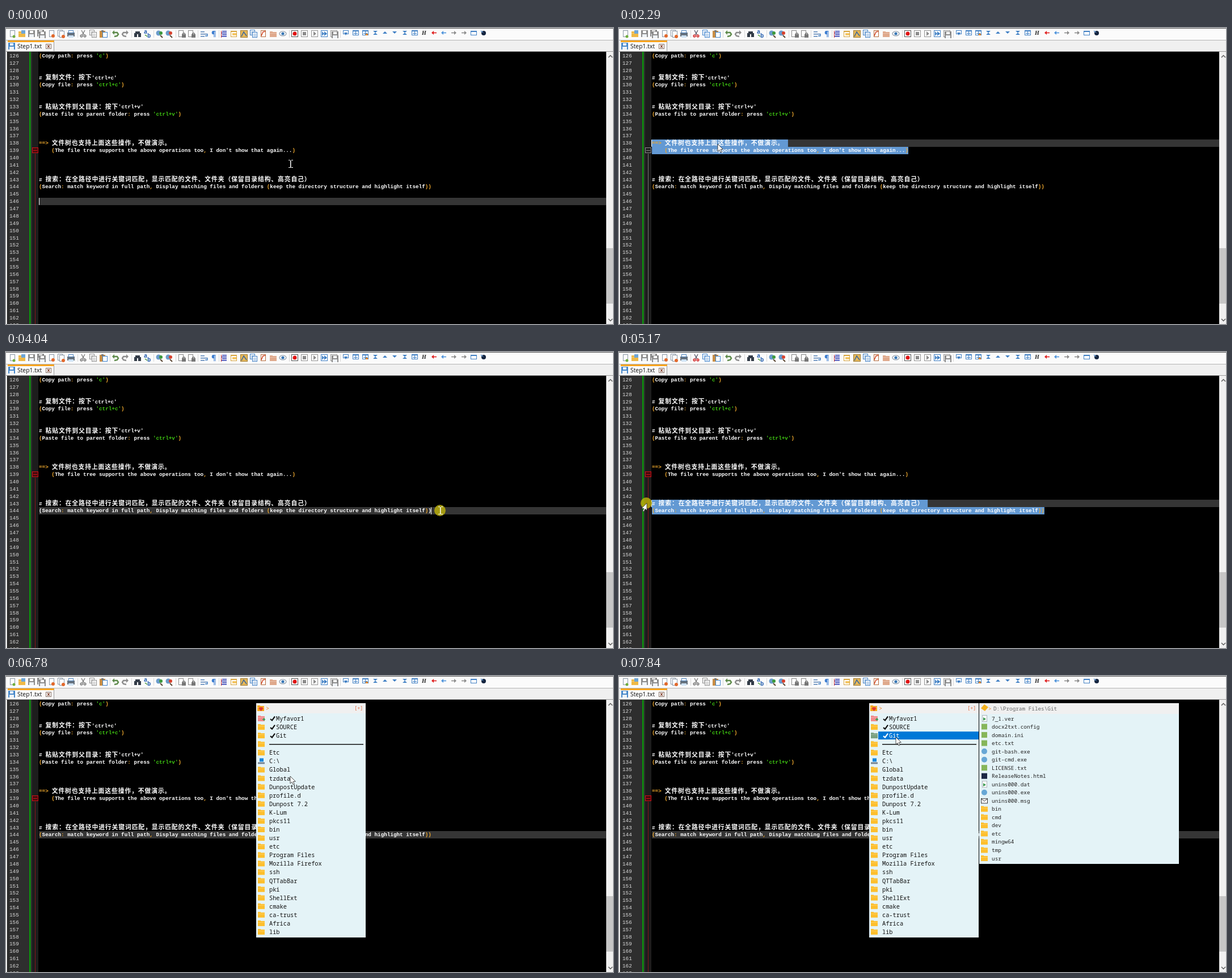
An HTML page with a canvas that plays this animation: 1070x523 px, repeating every 8000 ms.

```html
<!DOCTYPE html>
<html lang="en">
<head>
<meta charset="utf-8">
<title>Editor demo</title>
<style>
html, body { margin: 0; width: 100%; height: 100%; overflow: hidden; background: #000; }
canvas { display: block; }
</style>
</head>
<body>
<canvas id="stage" width="1070" height="523"></canvas>
<script>
const ctx = document.getElementById('stage').getContext('2d');
const LOOP = 8000, LEFT = 58, PITCH = 5.58, WIDE = 11.7, LINE_H = 12.86, FIRST = 126;
const MONO = '9.3px "Liberation Mono", monospace';
const CODE = 'bold ' + MONO;
const CJK = 'bold 10.8px "Noto Sans CJK SC", "Noto Sans CJK", sans-serif';
const MENU = '10.3px "Noto Sans Mono", monospace';
const SUB = '9.4px "Noto Sans Mono", monospace';

const LINES = {
  126: "(Copy path: press 'c')",
  129: "# 复制文件：按下'ctrl+c'",
  130: "(Copy file: press 'ctrl+c')",
  133: "# 粘贴文件到父目录：按下'ctrl+v'",
  134: "(Paste file to parent folder: press 'ctrl+v')",
  138: "==> 文件树也支持上面这些操作，不做演示。",
  139: "    (The file tree supports the above operations too, I don't show that again...)",
  143: "# 搜索：在全路径中进行关键词匹配，显示匹配的文件、文件夹（保留目录结构、高亮自己）",
  144: "(Search: match keyword in full path, Display matching files and folders (keep the directory structure and highlight itself))"
};
const FAVORITES = ['+Myfavor1', '+SOURCE', '+Git', '-', 'Etc', 'C:\\', 'Global', 'tzdata', 'DunpostUpdate',
  'profile.d', 'Dunpost 7.2', 'K-Lum', 'pkcs11', 'bin', 'usr', 'etc', 'Program Files', 'Mozilla Firefox',
  'ssh', 'QTTabBar', 'pki', 'ShellExt', 'cmake', 'ca-trust', 'Africa', 'lib'];
const FILES = ['7_1.ver', 'docx2txt.config', 'domain.ini', 'etc.txt', 'git-bash.exe', 'git-cmd.exe',
  'LICENSE.txt', 'ReleaseNotes.html', 'unins000.dat', 'unins000.exe', 'unins000.msg',
  'bin', 'cmd', 'dev', 'etc', 'mingw64', 'tmp', 'usr'];

// Pointer path: time, x, y
const PATH = [
  [0, 502, 240], [70, 502, 240], [260, 534, 222], [440, 534, 222], [520, 515, 217], [860, 160, 214],
  [950, 93, 211], [1140, 51, 198], [1940, 51, 198], [2290, 174, 205], [2930, 174, 205],
  [3550, 740, 277], [3750, 764, 280], [4040, 766, 280], [4100, 764, 280], [4400, 190, 277],
  [4570, 42, 267], [4640, 41, 267], [5150, 41, 267], [5170, 49, 267], [5300, 60, 270],
  [5700, 313, 282], [5900, 313, 286], [6060, 313, 290], [6250, 380, 415], [6400, 610, 330],
  [6580, 501, 177], [6800, 501, 177], [7480, 488, 92], [7640, 488, 92], [7840, 488, 108], [LOOP, 488, 108]
];
const DRAGS = [
  { press: 520, release: 1950, end: 3640, line: 139 },
  { press: 3640, release: 5300, end: 5720, line: 144 }
];

function pointer(t) {
  let i = 1;
  while (i < PATH.length - 1 && PATH[i][0] < t) i++;
  const [t0, x0, y0] = PATH[i - 1], [t1, x1, y1] = PATH[i];
  const k = Math.max(0, Math.min(1, (t - t0) / (t1 - t0)));
  return { x: x0 + (x1 - x0) * k, y: y0 + (y1 - y0) * k };
}

const isWide = c => c > '\u2fff';
const lineEnd = n => LEFT + [...(LINES[n] || '')].reduce((w, c) => w + (isWide(c) ? WIDE : PITCH), 0);
const lineY = n => 49 + (n - FIRST) * LINE_H;

function rect(color, x, y, w, h) { ctx.fillStyle = color; ctx.fillRect(x, y, w, h); }
function box(color, x, y, w, h) { ctx.strokeStyle = color; ctx.lineWidth = 1; ctx.strokeRect(x + .5, y + .5, w - 1, h - 1); }
function path(points, dx = 0, dy = 0) {
  ctx.beginPath();
  for (let i = 0; i < points.length; i += 2) ctx.lineTo(points[i] + dx, points[i + 1] + dy);
}
function poly(color, points, dx, dy) { path(points, dx, dy); ctx.fillStyle = color; ctx.fill(); }
function line(color, width, points, dx, dy) {
  path(points, dx, dy);
  ctx.strokeStyle = color; ctx.lineWidth = width; ctx.stroke();
}
function disc(color, x, y, r) { ctx.beginPath(); ctx.arc(x, y, r, 0, 7); ctx.fillStyle = color; ctx.fill(); }
function ring(color, x, y, r, a = 0, b = 7) {
  ctx.beginPath(); ctx.arc(x, y, r, a, b); ctx.strokeStyle = color; ctx.lineWidth = 1.5; ctx.stroke();
}
function text(s, x, y, color, font) { ctx.font = font; ctx.fillStyle = color; ctx.fillText(s, x, y); }

// Toolbar icons, each centred at x
function page(x, edge = '#8a97a5', y = 10, h = 12) { rect('#fff', x - 4, y - h / 2, 9, h); box(edge, x - 4, y - h / 2, 9, h); }
function pages(x, edge) {
  for (const d of [-2, 2]) {
    page(x + d, edge, 10 + d, 10);
    for (let y = 8; y < 13; y += 2) rect(edge, x + d - 2, y + d, 5, .6);
  }
}
function floppy(x, y, color) {
  rect(color, x - 6, y - 6, 12, 12);
  rect('#fff', x - 3, y - 5, 6, 4);
  rect('#eef2f6', x - 4, y + 1, 8, 5);
}
function folder(x, y, color = '#fdbf2d') {
  rect(color, x - 6, y - 5, 5, 3);
  rect(color, x - 6, y - 4, 12, 9);
  rect('rgba(255,255,255,.25)', x - 6, y - 2, 12, 1);
}
function textRows(x, color) { for (let y = 5; y < 16; y += 3) rect(color, x - 5 + (y % 2) * 2, y, 10 - (y % 2) * 2, 1.5); }
function panel(x, color, y = 5, h = 11) { rect('#fff', x - 5, y, 11, h); box(color, x - 5, y, 11, h); rect(color, x - 5, y, 11, 2); }
function arrow(x, dir, color) {
  line(color, 1.6, [-4 * dir, 0, 3 * dir, 0], x, 8.5);
  poly(color, [5 * dir, 0, dir, -3.5, dir, 3.5], x, 8.5);
}
function lockPage(x) { page(x - 2, '#888'); rect('#777', x, 11, 7, 6); ring('#777', x + 3.5, 11, 2, Math.PI, 0); }
function scissors(x, on) {
  const blade = on ? '#556' : '#777', handle = on ? '#d02020' : '#777';
  line(blade, 1.3, [-3, -6, 2, 3], x, 10);
  line(blade, 1.3, [3, -6, -2, 3], x, 10);
  ring(handle, x - 3, 14, 1.8);
  ring(handle, x + 3, 14, 1.8);
}

function toolbar(hasSelection) {
  const blue = '#3f7fc4', gray = '#8c8c8c';
  rect('#fbfbfb', 0, 0, 1070, 22);
  rect('#f0f0f0', 0, 22, 1070, 20);
  rect('#555', 0, 0, 1070, 1);
  rect('#b4b4b4', 0, 21, 1070, 1);
  page(11); disc('#6fae3c', 14, 15, 2.5);
  folder(28, 11, '#efb947'); rect('#6ea6d8', 27, 4, 7, 6);
  floppy(45, 10, gray);
  floppy(61, 9, gray); floppy(64, 12, gray);
  page(80); disc('#e2692c', 83, 14, 3);
  page(95, undefined, 9); page(98, undefined, 11); disc('#e2692c', 101, 15, 3);
  rect('#66727e', 108, 8, 13, 7); rect('#fff', 110, 4, 9, 5); box('#4c82bd', 110, 4, 9, 5); rect('#cfe3f5', 110, 13, 9, 4);
  scissors(136, hasSelection);
  pages(153, hasSelection ? '#3d82cc' : gray);
  rect('#c98e45', 165, 5, 10, 12); rect('#777', 168, 4, 4, 3); page(174, '#3d82cc', 12, 10);
  for (const [x, dir, color] of [[193, 1, '#5d8a4a'], [210, -1, gray]]) {
    line(color, 2.4, [-4 * dir, 8, 3 * dir, 8, 5 * dir, 11, 3 * dir, 14, -2 * dir, 15], x, 0);
    poly(color, [-6 * dir, 8, -2 * dir, 4, -2 * dir, 12], x, 0);
  }
  rect('#333c48', 226, 9, 5, 7); rect('#333c48', 233, 9, 5, 7); rect('#333c48', 228, 6, 8, 5);
  text('a', 243, 10, '#2a62b0', 'bold 10px "Open Sans", sans-serif');
  text('b', 249, 17, '#2a62b0', 'bold 10px "Open Sans", sans-serif');
  line('#469a38', 1.5, [245, 12, 249, 15]);
  for (const [x, color] of [[271, '#3e9a3e'], [288, '#d9432f']]) {
    disc('#6b9ccc', x - 2, 9, 4.5); disc(color, x + 2, 9, 3); line('#5a4632', 2, [1, 13, 5, 17], x, 0);
  }
  lockPage(310); lockPage(327);
  for (const y of [6, 10, 14]) rect('#527fb5', 343, y, y === 10 ? 12 : 7, 1.5);
  line('#3878c0', 1.3, [355, 10, 355, 14, 351, 14]);
  text('¶', 362, 15, '#3e7ed0', 'bold 13px "Open Sans", sans-serif');
  textRows(384, '#2635b0'); rect('#c33', 379, 5, 1, 12);
  panel(401, '#d6a33b'); rect('#f4c664', 399, 9, 7, 4);
  rect('#e6b85a', 413, 4, 13, 13); box('#a27a2c', 413, 4, 13, 13); line('#38669b', 1.5, [415, 15, 419, 7, 424, 14]);
  pages(436, blue);
  page(453, '#b56a3c'); line('#d44e2e', 1.6, [450, 14, 453, 7, 457, 6]);
  folder(471, 11, '#dfa98c');
  ctx.beginPath(); ctx.ellipse(488, 10, 6, 4, 0, 0, 7); ctx.strokeStyle = '#8b98a6'; ctx.lineWidth = 1.2; ctx.stroke();
  disc('#3877b5', 488, 10, 2.6);
  for (const x of [509, 526, 544, 561, 578]) {
    const edge = x === 561 ? blue : '#929292';
    rect('#fff', x - 6, 4, 12, 12); box(x === 509 ? '#555' : edge, x - 6, 4, 12, 12);
  }
  disc('#e01313', 509, 10, 3.5); rect(gray, 523, 7, 6, 6);
  poly(gray, [542, 6, 547, 10, 542, 14]);
  poly(blue, [557, 6, 561, 10, 557, 14]); poly(blue, [561, 6, 566, 10, 561, 14]);
  floppy(580, 12, gray);

  box(blue, 594, 4, 10, 7); poly(blue, [596, 8, 602, 8, 599, 13]);
  for (const x of [616, 633, 720]) { panel(x, blue, 4, 9); rect(blue, x - 3, 9, 7, 1); rect(blue, x, 6, 1, 6); }
  rect('#e68a2e', 634, 10, 4, 3);
  for (const x of [651, 703]) { poly(blue, [-4, 5, 4, 5, 0, 8.5, 4, 12, -4, 12, 0, 8.5], x, 0); }
  poly(blue, [664, 10, 672, 10, 668, 6]); poly(blue, [681, 6, 689, 6, 685, 10]);
  text('H', 733, 12, '#222', 'italic bold 10px "Liberation Serif", serif');
  arrow(755, -1, '#e02020'); arrow(772, -1, '#4f94db'); arrow(789, 1, gray); arrow(807, 1, gray);
  panel(824, blue, 5, 8);
  disc('#15253f', 842, 9, 4); line('#5a93d2', 1.5, [837, 5, 841, 8]);

  for (const x of [126, 183, 221, 260, 299, 338, 375, 499, 589]) rect('#d8d8d8', x, 4, 1, 13);

  rect('#fafafa', 3, 22, 82, 20); rect('#f7a31d', 3, 22, 82, 3);
  rect('#9b9b9b', 84, 24, 1, 18); rect('#999', 0, 41, 1070, 1);
  floppy(10, 32, '#4687c9');
  text('Step1.txt', 20, 36, '#111', '10.4px "Open Sans", sans-serif');
  box('#8a7468', 70, 28, 10, 9);
  line('#8a4f3c', 1.4, [73, 30, 77, 35]); line('#8a4f3c', 1.4, [77, 30, 73, 35]);
}

function codeLine(n, bright) {
  const source = LINES[n], comment = source[0] === '#';
  let x = LEFT, quoted = false;
  [...source].forEach((c, i) => {
    const wide = isWide(c);
    const quote = c === "'" && !comment && n !== 139;
    if (quote) quoted = !quoted;
    let color = '#fff';
    if (quote || quoted) color = '#3fc812';
    else if (!comment && '(),:=>'.includes(c)) color = '#eda62c';
    if (bright && (i === source.length - 1 || i === source.indexOf('('))) color = '#fff';
    if (wide) text(c, x + .4, lineY(n) + 3.6, color, CJK);
    else if (c !== ' ') text(c, x, lineY(n) + 3, color, CODE);
    x += wide ? WIDE : PITCH;
  });
}

function editorState(t) {
  const drag = DRAGS.find(d => t >= d.press && t < d.end);
  if (!drag) return t < 520 ? { line: 146, x: LEFT } : { line: 144, x: LEFT + 45 * PITCH };
  const end = lineEnd(drag.line);
  const m = pointer(Math.max(drag.press, Math.min(t, drag.release) - 20));
  const row = Math.floor((m.y - 49) / LINE_H + .5) + FIRST;
  const n = Math.min(drag.line, row);
  const x = Math.min(lineEnd(n), LEFT + Math.max(0, Math.round((m.x - LEFT) / PITCH)) * PITCH);
  const spans = [];
  if (n === drag.line) {
    if (x < end - 1) spans.push([n, x, end]);
  } else {
    spans.push([n, x, lineEnd(n) + 7], [drag.line, LEFT, end]);
  }
  return { line: n, x, spans, held: t < drag.release };
}

function rowBand(color, n, x, w) { rect(color, x, Math.round(lineY(n) - 6.4), w, 13); }

function editor(t, state) {
  rect('#000', 0, 42, 1070, 481);
  rect('#f0f0f0', 0, 42, 2, 481);
  rect('#2e2e2e', 3, 42, 43, 481);
  rect('#0b960b', 41, 42, 2.5, 481);
  rect('#1d1d1d', 46, 42, 11, 481);
  rowBand('#353535', state.line, LEFT, 1000);
  for (const [n, a, b] of state.spans || []) rowBand('#6399d3', n, a, b - a);
  for (let n = FIRST; n < 164; n++) text(n, 6, lineY(n) + 3, '#dadada', MONO);

  const inFold = state.line >= 139;
  rect(inFold ? '#86141b' : '#777', 51, 222, 1, 301);
  rect(inFold ? '#4a0a0d' : '#222', 46, 211, 11, 10);
  box(inFold ? '#d01118' : '#8b8b8b', 46, 211, 11, 10);
  rect(inFold ? '#d01118' : '#8b8b8b', 48, 216, 7, 1);

  const atEnd = Math.abs(state.x - lineEnd(state.line)) < 1;
  for (const n of Object.keys(LINES).map(Number)) codeLine(n, atEnd && n === state.line);
  const blinkOff = (t >= 1730 && t < 2260) || t >= 6230;
  if (!blinkOff) rect('#fff', Math.round(state.x) - (state.spans ? 1 : 0), lineY(state.line) - 6, 1, 12.5);

  rect('#f0f0f0', 1058, 42, 12, 481);
  rect('#c6c6c6', 1058, 389, 12, 98);
  line('#555', 1.3, [1062, 52, 1065.5, 48.5, 1069, 52]);
  line('#555', 1.3, [1062, 514, 1065.5, 517.5, 1069, 514]);
}

function favorites(hover) {
  rect('#e4f3f7', 441, 48, 193, 414);
  rect('#f0f0f0', 441, 48, 193, 18);
  folder(449, 57, '#f5a81e'); disc('#e23b32', 448, 57, 2); disc('#e23b32', 451, 57, 2);
  poly('#e23b32', [446, 58, 453, 58, 449.5, 62]);
  text('>', 458, 61, '#e8842c', MENU);
  text('[+]', 614, 60, '#e0683e', '8.6px "Noto Sans Mono", monospace');
  FAVORITES.forEach((name, i) => {
    const y = 75 + i * 15.08, active = i === hover, color = active ? '#fff' : '#111';
    if (active) rect('#0078d7', 457, y - 7, 177, 14);
    if (name === 'C:\\') { rect('#1687dc', 447, y - 5, 7, 6); rect('#77838f', 444, y + 2, 12, 3); }
    else folder(450, y, active ? '#78a080' : i ? undefined : '#f28b8b');
    if (!i) { rect('#2c9d4b', 452, y + 1, 5, 1.5); rect('#2c9d4b', 454, y - 1, 1.5, 5); }
    if (name === '-') rect('#111', 464, 120, 166, 1.5);
    else if (name[0] === '+') {
      line(color, 2.2, [466, 1, 469, 3.5, 474, -3.5], 0, y);
      text(name.slice(1), 476, y + 4, color, MENU);
    } else text(name, 464, y + 4, color, MENU);
  });
}

function fileIcon(name, x, y) {
  const ext = name.split('.')[1];
  if (!ext) folder(x, y);
  else if (ext === 'exe') disc('#67a7d5', x, y, 5);
  else if (ext === 'html') rect('#1c2745', x - 5, y - 5, 10, 10);
  else if (ext === 'msg') {
    rect('#fff', x - 6, y - 4, 12, 9); box('#333', x - 6, y - 4, 12, 9);
    line('#333', 1, [-6, -4, 0, 1, 6, -4], x, y);
  } else if (ext === 'ver' || ext === 'dat') {
    rect('#fff', x - 4, y - 6, 9, 12); box('#a9b2b8', x - 4, y - 6, 9, 12);
    poly('#3b9a50', [-2, -2, 3, 1, -2, 4], x, y);
  } else rect('#86b65a', x - 5, y - 5, 10, 10);
}

function submenu() {
  rect('#e4f3f7', 635, 48, 352, 284);
  rect('#f0f0f0', 635, 48, 352, 19);
  poly('#f5b21f', [638, 57, 644, 50, 651, 55, 645, 62]);
  text('>', 651, 61, '#e8842c', SUB);
  text('D:\\Program Files\\Git', 660, 60.5, '#666', '9.35px "Noto Sans Mono", monospace');
  FILES.forEach((name, i) => {
    const y = 75 + i * 14.53;
    fileIcon(name, 644, y);
    text(name, 657, y + 3.5, '#222', SUB);
  });
}

function arrowCursor(x, y, mirrored) {
  ctx.save();
  ctx.translate(x, y);
  if (mirrored) ctx.scale(-1, 1);
  const shape = [0, 0, 0, 13, 3, 10.3, 5.2, 15, 7.3, 14, 5.2, 9.5, 9.3, 9.3, 0, 0];
  poly('#fff', shape);
  line('#222', .8, shape);
  ctx.restore();
}
function beamCursor(x, y) {
  x = Math.round(x); y = Math.round(y);
  rect('#fff', x - 1, y - 6, 1.5, 13);
  for (const edge of [y - 7, y + 6]) { rect('#fff', x - 4, edge, 3, 1); rect('#fff', x + 1, edge, 3, 1); }
}

function draw(t) {
  const state = editorState(t), m = pointer(t), spans = state.spans || [];
  const popup = t >= 6780;
  ctx.clearRect(0, 0, 1070, 523);
  editor(t, state);
  toolbar(spans.length > 0);
  if (popup) {
    favorites(t > 6850 ? Math.round((m.y - 75) / 15.08) : -1);
    if (t >= 7720) submenu();
  }
  const held = state.held || (t >= 5720 && t < 5880);
  if (held) disc('rgba(190,178,10,.82)', m.x - 1, m.y, 10);
  const overSelection = !held && spans.some(([n, a, b]) => Math.abs(m.y - lineY(n)) < 6.5 && m.x >= a && m.x < b);
  if (popup || overSelection) arrowCursor(m.x, m.y);
  else if (m.x < LEFT) arrowCursor(m.x, m.y, true);
  else beamCursor(m.x, m.y);
}

function tick(now) {
  draw(now % LOOP);
  requestAnimationFrame(tick);
}
draw(0);
requestAnimationFrame(tick);
</script>
</body>
</html>
```
